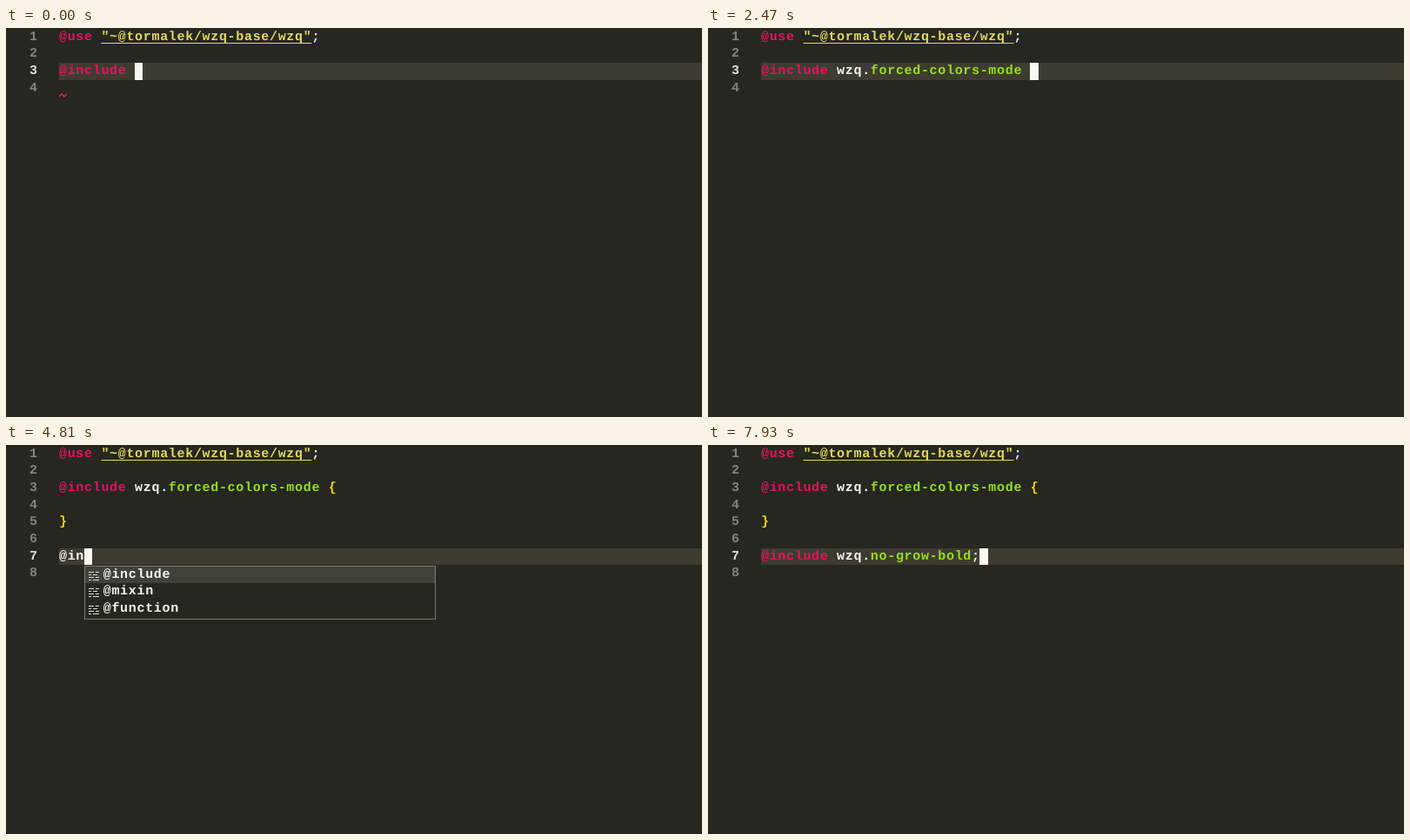
Animation, 800 px wide and 448 px high, one loop 8000 ms. Source, as an HTML page:

```html
<!DOCTYPE html>
<html lang="en">
<head>
<meta charset="utf-8">
<title>Editor autocomplete</title>
<style>
  :root { --ch: 9.68px; --row: 19.64px; }
  html, body { margin: 0; width: 100%; height: 100%; overflow: hidden; background: #262721; }
  #editor {
    position: relative; width: 800px; height: 448px; overflow: hidden;
    background: #262721; color: #f8f8f2;
    font: bold 15px/var(--row) "Liberation Mono", monospace;
    letter-spacing: .678px;
    font-variant-ligatures: none;
    text-rendering: geometricPrecision; white-space: pre;
  }
  #editor div, #editor svg { position: absolute; }
  .num { left: 27px; color: #84847d; }
  .num.on { color: #e4e4de; }
  .code { left: 61px; }
  .band { left: 61px; right: 0; height: var(--row); background: #3e3c30; }
  .caret { width: var(--ch); height: var(--row); background: #f8f8f0; }
  .kw { color: #e8125f; }
  .fn { color: #98e01a; }
  .str { color: #e6d75c; text-decoration: underline 1.4px; text-underline-offset: 3px; }
  .br { color: #f7d21c; }
  .pair { display: inline-block; height: var(--row); outline: 1px solid #8d8c80; outline-offset: -1px; }
  .menu { width: 402px; border: 1px solid #7d7b66; background: #262721; }
  .item { left: 0; right: 0; height: var(--row); }
  .item.on { background: #40423a; }
  .item div { left: 21px; }
  .item i { font-style: normal; color: #9b9b94; }
  .item svg { left: 3px; top: 3px; }
  .bar { right: 0; top: 0; width: 10px; height: 111px; background: #575852; }
</style>
</head>
<body>
<div id="editor"></div>
<script>
const CH = 9.68, ROW = 19.64, LEFT = 60.7, LOOP = 8000, TICK = 130;

const menus = {
  all: ['chevron($size, $color, $weight, $rot…', 'compact-mode', 'dark-mode-variables',
    'decorative($content)', 'flex($align-items, $justify-conten…', 'forced-colors-mode',
    'forced-colors-svg-fallback($stroke,…', 'from-large-device', 'from-medium-device',
    'keyboard-navigation', 'large-device', 'light-mode-variables'],
  f: ['flex($align-items, $justify-conten…', 'forced-colors-mode',
    'forced-colors-svg-fallback($stroke,…', 'from-large-device', 'from-medium-device',
    'screen-from($min)', 'screenreader-only-focusable'],
  n: ['no-grow-bold', 'keyboard-navigation', 'screenreader-only-focusable'],
  rules: ['@charset', '@content', '@debug', '@each', '@else', '@error', '@extend',
    '@font-face', '@for', '@forward', '@function', '@if'],
  in: ['@include', '@mixin', '@function']
};

const first = '@use "~@tormalek/wzq-base/wzq";';
const inc = '@include ';
const mode = inc + 'wzq.forced-colors-mode';
const block = [mode + ' {', '', '}'];

// Each step: start time, lines from line 3 on, extras. The caret defaults to the end of the text.
const steps = [];
const add = (t, lines, extra = {}) => steps.push({ t, lines, ...extra });
const line3 = (t, text, extra) => add(t, [text], extra);
const line7 = (t, text, extra) => add(t, [...block, '', text], extra);
const red = { line: 4, cols: 1, color: '#f02828' };
const amber = { line: 7, cols: 3, color: '#e0c424' };

line3(0, inc, { wave: red });
line3(260, inc + 'w', { wave: red });
line3(390, inc + 'wz');
line3(520, inc + 'wzq');
line3(780, inc + 'wzq.');
line3(910, inc + 'wzq.', { menu: 'all' });
line3(1430, inc + 'wzq.f', { menu: 'f' });
line3(1950, inc + 'wzq.f', { menu: 'f', pick: 1 });
line3(2210, mode);
line3(2470, mode + ' ');
line3(2600, mode + ' {}', { caret: [3, 33], pair: true });
add(2860, block, { caret: [4, 2], pair: true });
add(3770, block, { pair: true });
add(3900, [...block, '']);
line7(4160, '');
line7(4290, '@');
line7(4420, '@', { menu: 'rules' });
line7(4550, '@i', { menu: 'rules', pick: 11 });
line7(4680, '@in', { menu: 'in' });
line7(5070, '@include');
line7(5200, inc, { wave: amber });
line7(5460, inc + 'w', { wave: amber });
line7(5590, inc + 'wz', { wave: amber });
line7(5720, inc + 'wzq', { wave: amber });
line7(5980, inc + 'wzq.', { wave: amber });
line7(6110, inc + 'wzq.', { wave: amber, menu: 'all' });
line7(6760, inc + 'wzq.n', { menu: 'n' });
line7(7020, inc + 'wzq.no', { menu: 'n' });
line7(7280, inc + 'wzq.no-grow-bold');
line7(7670, inc + 'wzq.no-grow-bold;');

const span = (cls, text) => `<span class="${cls}">${text}</span>`;
const div = (cls, style, body = '') => `<div class="${cls}" style="${style}">${body}</div>`;
const lineTop = n => (n - 1) * ROW + 0.8;
const colLeft = c => LEFT + c * CH;

function paint(text, pair) {
  return text.replace(/^@(use|include)(?= )|".*"|(?<= )\w+\.?$|(?<=\.)[\w-]+|[{}]/g, s => {
    if (s[0] === '@') return span('kw', s);
    if (s[0] === '"') return span('str', s);
    if (/[{}]/.test(s)) return span(pair ? 'br pair' : 'br', s);
    return span('fn', s);
  });
}

function wave({ line, cols, color }) {
  const n = Math.round(cols * CH / 3);
  const pts = Array.from({ length: n + 1 }, (_, i) => `${i * 3},${i % 2 ? 1 : 4}`).join(' ');
  return `<svg width="${n * 3}" height="5" style="left:61px;top:${lineTop(line) + 15.3}px">` +
    `<polyline points="${pts}" fill="none" stroke="${color}" stroke-width="1.3"/></svg>`;
}

function icon(keyword) {
  const d = keyword
    ? 'M1 3.5h6M9 3.5h4M1 6.5h3M6 6.5h5M1 9.5h6M9 9.5h4M1 12.5h3M6 12.5h7'
    : 'M1.5 2.5h11v11h-11z';
  return `<svg width="15" height="15"><path d="${d}" fill="none" stroke="#deded8" stroke-width="1.1"/></svg>`;
}

function menuBox(name, pick, line, col) {
  const list = menus[name];
  const rows = list.map((text, i) => {
    const [label, args] = text.split('(');
    const body = label + (args ? `<i>(${args}</i>` : '');
    return div(i === pick ? 'item on' : 'item', `top:${i * ROW}px`,
      icon(text[0] === '@') + `<div>${body}</div>`);
  }).join('');
  const bar = list.length > 11 ? div('bar', '') : '';
  return div('menu',
    `left:${colLeft(col)}px;top:${lineTop(line + 1) + 0.3}px;height:${list.length * ROW + 2}px`,
    rows + bar);
}

function view(step, caretOn) {
  const lines = [first, '', ...step.lines, ''];
  const last = lines.length - 1;
  const [line, col] = step.caret || [last, lines[last - 1].length];
  let html = div('band', `top:${lineTop(line)}px`);
  lines.forEach((text, i) => {
    const y = `top:${lineTop(i + 1)}px`;
    html += div(i + 1 === line ? 'num on' : 'num', y, i + 1);
    html += div('code', y, paint(text, step.pair));
  });
  if (step.wave) html += wave(step.wave);
  if (caretOn) html += div('caret', `left:${colLeft(col)}px;top:${lineTop(line)}px`);
  if (step.menu) html += menuBox(step.menu, step.pick || 0, line, col);
  return html;
}

const editor = document.getElementById('editor');
const start = performance.now();
let shown = '';

function frame() {
  const time = (performance.now() - start) % LOOP;
  const t = Math.floor(time / TICK) * TICK;
  const i = steps.findLastIndex(s => s.t <= t);
  const caretOn = (t - steps[i].t) % 1000 < 500;
  const key = i + ':' + caretOn;
  if (key !== shown) {
    editor.innerHTML = view(steps[i], caretOn);
    shown = key;
  }
  requestAnimationFrame(frame);
}
frame();
</script>
</body>
</html>
```
